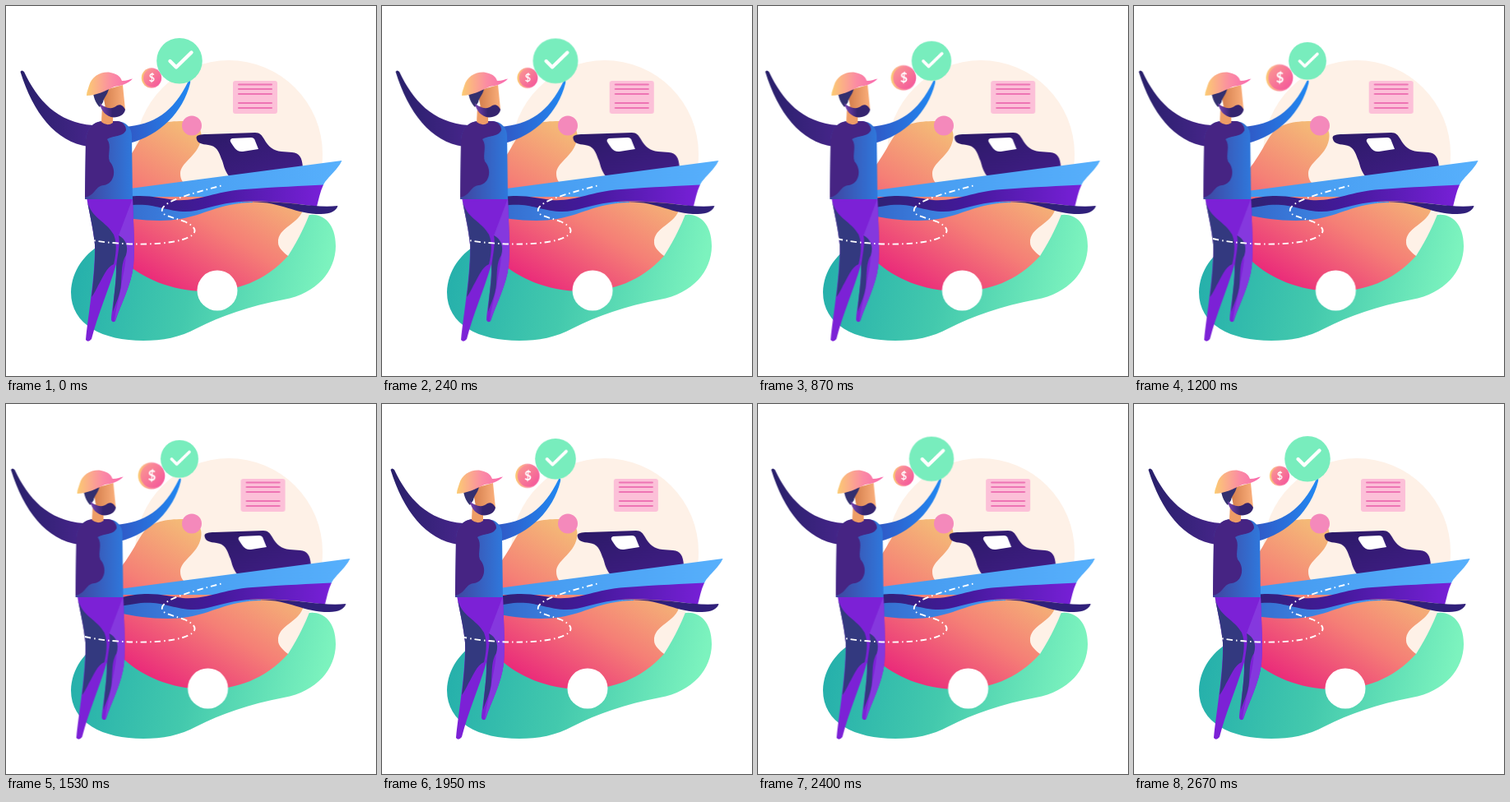
An HTML page without scripts that plays this animation: 450 by 450 pixels, repeating every 2.7 s.

```html
<!DOCTYPE html>
<html lang="en">
<head>
<meta charset="utf-8">
<title>Sailor and boat</title>
<style>
  html, body { margin: 0; width: 100%; height: 100%; overflow: hidden; background: #fff; }
  svg { display: block; width: 100%; height: 100%; }

  /* Every part swings out and back once per 2700 ms loop. */
  .drift, .grow {
    animation: drift 1350ms cubic-bezier(.37, 0, .63, 1) infinite alternate;
  }
  .grow { animation-name: grow; }
  .man, .ball { --dx: -12px; }
  .boat { --dx: 10.3px; }
  .note { --dx: 10px; }
  .tick { --size: .82; transform-origin: 211px 67px; }
  .coin { --size: 1.36; transform-origin: 177px 88px; }
  @keyframes drift { to { transform: translateX(var(--dx)); } }
  @keyframes grow { to { transform: scale(var(--size)); } }
</style>
</head>
<body>
<svg viewBox="0 0 450 450">
  <defs>
    <linearGradient id="green" y2=".1"><stop stop-color="#22adab"/><stop offset=".5" stop-color="#43c9ad"/><stop offset="1" stop-color="#7cf3be"/></linearGradient>
    <linearGradient id="sunset" gradientUnits="userSpaceOnUse" x1="185" y1="340" x2="285" y2="175">
      <stop stop-color="#ea2a7a"/><stop offset=".5" stop-color="#f57f76"/><stop offset="1" stop-color="#f4c077"/>
    </linearGradient>
    <linearGradient id="hull"><stop stop-color="#4397ee"/><stop offset="1" stop-color="#57b0fc"/></linearGradient>
    <linearGradient id="stripe"><stop stop-color="#2e2272"/><stop offset=".45" stop-color="#43199a"/><stop offset="1" stop-color="#7820d8"/></linearGradient>
    <linearGradient id="keel"><stop stop-color="#3468cb"/><stop offset="1" stop-color="#439af4"/></linearGradient>
    <linearGradient id="cabin" x2="1" y2="1"><stop stop-color="#2b1a66"/><stop offset="1" stop-color="#421d88"/></linearGradient>
    <linearGradient id="shirt"><stop stop-color="#40449f"/><stop offset="1" stop-color="#2f78dc"/></linearGradient>
    <linearGradient id="leftArm"><stop stop-color="#28206a"/><stop offset="1" stop-color="#46258a"/></linearGradient>
    <linearGradient id="rightArm"><stop stop-color="#3157c4"/><stop offset="1" stop-color="#2188f2"/></linearGradient>
    <linearGradient id="cap"><stop stop-color="#fbcb72"/><stop offset=".55" stop-color="#fb8ba4"/><stop offset="1" stop-color="#f968ae"/></linearGradient>
    <linearGradient id="coin" x2="1" y2="1"><stop stop-color="#fb9c92"/><stop offset="1" stop-color="#f4529c"/></linearGradient>
    <linearGradient id="skin"><stop stop-color="#d27b4a"/><stop offset="1" stop-color="#fbb07c"/></linearGradient>
    <linearGradient id="beard"><stop stop-color="#7a44b4"/><stop offset=".5" stop-color="#35246f"/></linearGradient>
  </defs>

  <!-- Backdrop -->
  <path fill="url(#green)" d="M79 348C80 322 95 300 122 286C200 250 300 270 362 256C378 249 401 258 401 292C401 322 378 350 338 357C295 365 262 377 232 392C212 403 190 407 167 407C118 407 79 388 79 348Z"/>
  <path fill="#fef1e7" d="M157 180A114 114 0 0 1 385 180C385 215 370 262 343 304L200 250Z"/>
  <path fill="url(#sunset)" d="M130 225C132 205 142 197 148 187C158 172 161 164 168 155C177 143 195 140 215 140C232 141 240 150 237 163C233 183 212 190 212 204C212 212 216 216 222 220C240 235 340 225 362 245C358 266 330 268 331 288C331 294 338 300 343 304C315 335 280 347 243 347C200 347 165 330 144 311C128 290 127 250 130 225Z"/>
  <circle cx="226" cy="145.5" r="12" fill="#f489bb"/>
  <circle class="drift ball" cx="257" cy="346" r="24.5" fill="#fff"/>

  <g class="drift note">
    <rect x="276" y="91" width="54" height="40" rx="3" fill="#fcc0d8"/>
    <path fill="none" stroke="#ee74b4" stroke-width="2" stroke-linecap="round" d="M283 95.5H323M283 101H323M283 107H323M283 118H323M283 124H323"/>
  </g>

  <g class="drift boat">
    <path fill="url(#cabin)" d="M231.5 160C232 157 236 156 244 156L303 154C309 154 311 157 314 162C319 171 325 176 335 177L348 178C357 179 360 184 361 196L272 208C264 198 265 191 262 186C259 177 256 170 246 169C238 168 232 167 231.5 160Z"/>
    <path fill="#fff" d="M275 161L298 160Q302 160 303 164L307 174L288 177C280 178 277 171 273 165Q272 162 275 161Z"/>
    <path fill="url(#keel)" d="M128 238H300V239C290 239 282 240 272 242C240 249 225 261 187 261C165 261 145 258 128 254Z"/>
    <path fill="url(#hull)" d="M128 225L408.5 188C404 199 388 211 386 218L290 232H128Z"/>
    <path fill="url(#stripe)" d="M128 236C165 226 185 234 205 236C235 238 250 226 290 223C330 220 360 219 386 217.5C382 226 380 236 378 244C340 238 300 236 276 239C250 242 235 251 215 250C190 248 180 240 154 242L128 246Z"/>
    <path fill="#30207a" d="M276 240C330 232 345 253 383 253C395 253 402 249 403.5 243C370 247 335 233 276 240Z"/>
  </g>

  <g class="drift man">
    <!-- Legs -->
    <path fill="#7c21d6" d="M98 233H154C155 265 157 295 155 316C152 340 140 362 133 383Q130 386 128 382C129 365 134 345 134 314C125 345 112 374 104 405Q100 410 97 406C100 375 109 325 108 290C106 270 101 250 98 233Z"/>
    <path fill="#8538de" d="M154 234L137 279C150 288 146 312 141 335C139 352 133 368 132 384C140 362 152 340 155 316C157 295 155 265 154 234Z"/>
    <g fill="#33397f">
      <path d="M99 238C104 258 122 262 131 278C136 290 133 306 131 314C122 318 118 330 112 340C109 346 107 350 104 354C107 330 109 305 108 290C106 270 102 255 99 238Z"/>
      <path d="M137 279C146 284 149 292 146 303C140 312 141 325 140 338C139 352 133 362 130 372C131 350 135 330 134 318C136 300 139 290 137 279Z"/>
    </g>

    <!-- Arms and torso -->
    <path fill="url(#rightArm)" d="M145 147C180 144 203 130 222 91Q225 89 224 94C215 130 187 157 150 167Z"/>
    <path fill="url(#leftArm)" d="M17.5 80Q19 77 22 80C38 114 62 142 106 145L100 171C60 165 33 130 17.5 80Z"/>
    <path fill="url(#shirt)" d="M97 163C98 149 106 141 117 140H136C146 141 153 148 153 158L154 235H96Z"/>
    <path fill="#462483" d="M97 163C98 149 106 141 117 140H136C142 141 146 145 146 151C142 160 130 157 123 162C129 170 123 181 126 189C135 199 132 216 119 218C108 219 109 230 96 233Z"/>

    <!-- Head -->
    <path fill="#ee9c66" d="M117 122H130V142Q123 147 116 141Z"/>
    <path fill="url(#skin)" d="M117 103L142 96L145 126L122 129Z"/>
    <path fill="#33306f" d="M106 106L125 101C123 109 119 111 118 117L114 123C110 119 107 113 106 106Z"/>
    <path fill="url(#beard)" d="M114 118C120 125 130 126 135 121C140 119 143 122 145 126C144 132 138 135.5 131 135.5C122 135 115 127 114 118Z"/>
    <path fill="url(#cap)" d="M98 109C98 104 100 101 101 97C104 86 114 80 125 80.5C134 82 139 85 141 91C147 91 151 89 154 88.5C148 95 140 97 132 98C121 103 110 109 98 109Z"/>
  </g>

  <path fill="none" stroke="#fff" stroke-width="1.9" stroke-dasharray="7.5 4 1.5 4" d="M96 283C125 290 185 293 215 284C235 278 233 269 217 262C200 256 188 255 190 247C193 237 225 228 264 218"/>

  <g class="grow coin">
    <circle cx="177" cy="87.5" r="12.2" fill="url(#cap)"/>
    <circle cx="177.8" cy="87.5" r="10.8" fill="url(#coin)"/>
    <text x="177.4" y="92" font-family="Lato, sans-serif" font-size="12.5" font-weight="700" text-anchor="middle" fill="#fff">$</text>
  </g>
  <g class="grow tick">
    <circle cx="211" cy="66.7" r="27.8" fill="#78edbd"/>
    <path fill="none" stroke="#fff" stroke-width="4.4" stroke-linecap="round" stroke-linejoin="round" d="M199.5 67L207 74.5L225.5 56.5"/>
  </g>
</svg>
</body>
</html>
```
